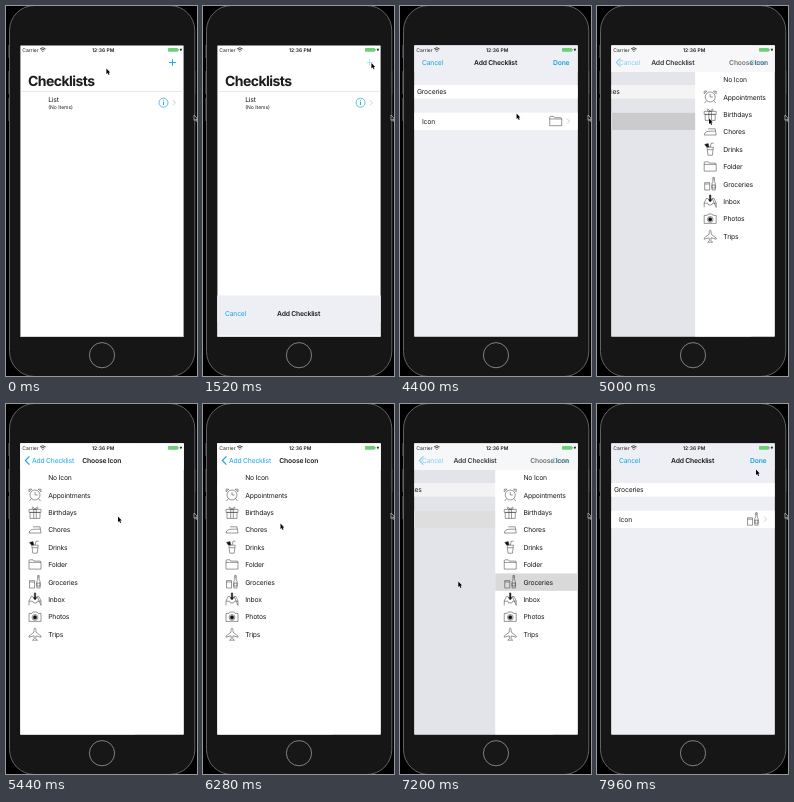
These frames come from a looping animation (191 px wide and 370 px high, 8000 ms). An HTML page:

```html
<!DOCTYPE html>
<html lang="en">
<head>
<meta charset="utf-8">
<title>Checklists</title>
<style>
  html, body { margin: 0; width: 100%; height: 100%; overflow: hidden; background: #000; }
  svg { display: block; width: 100vw; height: 100vh; }
  text { font: 6.8px Inter, Roboto, sans-serif; letter-spacing: -.03em; fill: #1c1c1c; white-space: pre; text-rendering: geometricPrecision; }
  .bold { font-weight: 600; }
  .large { font-size: 14px; font-weight: 700; letter-spacing: -.04em; }
  .small { font-size: 5px; letter-spacing: 0; }
  .tint { fill: #18a5e4; }
  .hint { fill: #c9c9cf; }
  .line { fill: none; stroke: #18a5e4; stroke-width: .9; }
  .chev { fill: none; stroke: #c4c4c9; stroke-width: .8; }
  .icon { fill: none; stroke: #333; stroke-width: .5; stroke-linejoin: round; }
  .icon .solid { fill: #111; }
</style>
</head>
<body>
<svg id="stage" viewBox="0 0 191 370"></svg>
<script>
const LOOP = 8000;
const stage = document.getElementById('stage');

const text = (x, y, str, cls = '', id = '') => `<text x="${x}" y="${y}" class="${cls}" id="${id}">${str}</text>`;
const rect = (x, y, w, h, fill, extra = '') => `<rect x="${x}" y="${y}" width="${w}" height="${h}" fill="${fill}" ${extra}/>`;
const page = (fill, extra) => rect(14, 39, 164, 292, fill, extra);
const path = (d, cls = '', extra = '') => `<path d="${d}" class="${cls}" ${extra}/>`;
const group = (id, body, extra = '') => `<g id="${id}" ${extra}>${body}</g>`;
const chevron = (x, y) => path(`M${x} ${y - 2.6}l2.4 2.6l-2.4 2.6`, 'chev');

// Line icons, each drawn around its own centre
const icons = {
  'No Icon': '',
  Appointments: '<circle r="5"/>' + path('M0-3V0H2.6M-3.6 3.6L-5.6 6M3.6 3.6L5.6 6M-6-3.2V-5.8H-3.2ZM6-3.2V-5.8H3.2Z'),
  Birthdays: path('M-6-3H6V0H-6ZM-5 0H5V6H-5ZM-1.3-3V6M1.3-3V6M0-3C-5-3-3-8 0-3C3-8 5-3 0-3'),
  Chores: path('M-6 3.2H6L5-3H-2M-6 3.2C-5.5 0-3-.6 0-.6H5.3'),
  Drinks: path('M-3.2-2H3.2L2.2 6H-2.2ZM-2.8 .5H2.8M0-2L1-6H3.5') + path('M-5.5-4.8L-2-5.6L-1.2-2.2H-3.6Z', 'solid'),
  Folder: path('M-6 4.5V-3.8Q-6-4.8-5-4.8H-2L-1-3.5H5Q6-3.5 6-2.5V4.5ZM-6-2.2H6'),
  Groceries: path('M-5.5 0H-.5V6H-5.5ZM-5.5-1.4H-.5V0M-5.5 0V-1.4M1.8 6V-.5L2.7-2.5V-6.5H4.2V-2.5L5.1-.5V6ZM1.8 1H5.1V4H1.8ZM2.7-5H4.2'),
  Inbox: path('M-6 6V1.5L-3.8-3H-2M2-3H3.8L6 1.5V6ZM-6 1.8H-2.5L-1.5 3.5H1.5L2.5 1.8H6') + path('M-.7-6.5H.7V-2H2L0 .6L-2-2H-.7Z', 'solid'),
  Photos: path('M-6-3.4H-3L-2-4.8H2L3-3.4H6V4.6H-6Z') + '<circle cy=".6" r="2.9"/><circle class="solid" cy=".6" r="1.8"/>',
  Trips: path('M0-6.3C1-6 1-4 1-2L6 1.8V3L1 1.6L.7 4.4L2.5 6H-2.5L-.7 4.4L-1 1.6L-6 3V1.8L-1-2C-1-4-1-6 0-6.3Z'),
};
const icon = (name, x, y, id = '') => group(id, icons[name], `class="icon" transform="translate(${x} ${y})"`);

const ROW = 17.4;
const iconRows = Object.keys(icons).map((name, i) => {
  const y = 73.6 + ROW * i;
  return icon(name, 29, y) + text(42.2, y + 2.5, name);
}).join('');

const arrow = 'M0 0V5.4L1.3 4.3L2.2 6.3L3.1 5.9L2.2 4H3.8Z';

const device =
  rect(2, 39, 2, 13, '#333') + rect(2, 65, 2, 23, '#333') + rect(2, 92, 2, 23, '#333') + rect(187.5, 65, 2, 23, '#333') +
  rect(3.5, -.5, 185.3, 371, '#161617', 'rx="25" stroke="#6c6c6f" stroke-width=".9"') +
  '<circle cx="96" cy="349.2" r="12.6" fill="#171718" stroke="#808083" stroke-width="1"/>';

const lists =
  page('#fff') +
  path('M163 56.5h7M166.5 53v7', 'line', 'id="plus"') +
  text(22, 79.5, 'Checklists', 'large') +
  rect(14, 85, 164, .6, '#dcdce0') +
  text(42.2, 95.5, 'List') + text(42.2, 102.8, '(No Items)', 'small') +
  '<circle class="line" cx="157.5" cy="96.7" r="4.5" style="stroke-width:.7"/>' +
  path('M157.5 95.7v3.4M157.5 93.7v.9', 'line') + chevron(167, 96.7);

const form = group('form',
  page('#eeeff4') +
  rect(14, 79, 164, 13.7, '#fff') + rect(14, 106.7, 164, 17.4, '#fff') +
  rect(14, 106.7, 164, 17.4, '#d4d4d6', 'id="pressed"') +
  text(17, 88.4, 'Name of the List', 'hint', 'hint') + text(17, 88.4, '', '', 'typed') +
  rect(0, 81.5, .9, 8.5, '#8fa3cc', 'id="caret"') +
  text(22, 117.7, 'Icon') + icon('Folder', 155.7, 115.2, 'folder') + icon('Groceries', 156, 115.2, 'bottle') +
  chevron(167, 115.2) + page('#000', 'id="dim"'));

const picker = group('picker',
  page('#fff') + rect(14, 65 + ROW * 6, 164, ROW, '#d9d9d9', 'id="chosen"') + iconRows);

const nav =
  rect(14, 39, 164, 27, '#eeeff4') + rect(14, 39, 164, 27, '#fff', 'id="light"') +
  text(22, 59, 'Cancel', 'tint', 'cancel') + text(153, 59, 'Done', 'tint bold', 'done') +
  text(0, 59, 'Add Checklist', 'bold', 'title') + text(0, 59, 'Add Checklist', 'tint', 'back') +
  text(0, 59, 'Choose Icon', 'bold', 'next') +
  path('M23.4 52.4l-4 4.1l4 4.1', 'line', 'id="chev" style="stroke-width:1.2"');

const status =
  text(16.3, 45.7, 'Carrier', 'small') + text(86, 45.7, '12:36 PM', 'small bold') +
  path('M34 42.9q2.8-2.4 5.6 0M35 44.1q1.8-1.5 3.6 0M36.2 45.3h1.2', '', 'fill="none" stroke="#222" stroke-width=".8"') +
  rect(162, 41.9, 10, 3.9, '#6bd075', 'rx=".8"') + rect(172.3, 43, .6, 1.7, '#888') +
  path('M173.6 42.8h2.6l-1.3 2.6z', '', 'fill="#222"');

stage.innerHTML =
  '<clipPath id="screen"><rect x="14.4" y="39.5" width="163.2" height="291"/></clipPath>' + device +
  group('view', lists + group('modal', form + picker + nav) + status, 'clip-path="url(#screen)"') +
  path(arrow, '', 'transform="translate(188 109)" fill="#111" stroke="#ccc" stroke-width=".7"') +
  path(arrow, '', 'id="pointer" fill="#000" stroke="#fff" stroke-width=".5" paint-order="stroke"');

const el = {};
stage.querySelectorAll('[id]').forEach(n => { if (n.id) el[n.id] = n; });
const move = (n, x, y = 0) => n.setAttribute('transform', `translate(${x} ${y})`);
const fade = (n, a) => n.setAttribute('opacity', Math.max(0, Math.min(1, a)));
const mix = (a, b, p) => a + (b - a) * p;

// Critically damped spring, 0 to 1
const spring = (ms, rate) => {
  if (ms <= 0) return 0;
  const k = ms * rate / 1000;
  const p = 1 - (1 + k) * Math.exp(-k);
  return p > .995 ? 1 : p;
};

const keys = [2720, 2880, 3080, 3160, 3280, 3360, 3560, 3760, 3840];

// Pointer way points: time, x, y
const route = [
  [80, 100.4, 62.6], [260, 128, 66.5], [480, 167.6, 57.5], [680, 167.6, 57.5], [760, 168.4, 57],
  [3840, 168.4, 57], [4400, 116.6, 107.6], [4520, 113, 110], [4680, 112, 112.6], [5440, 112, 112.6],
  [6240, 79, 115], [6800, 58.3, 177.6], [7240, 58.3, 177.6], [7760, 138, 87], [7960, 159, 65.6],
];
function pointerAt(t) {
  const i = route.findIndex(r => r[0] > t);
  if (i === 0) return route[0].slice(1);
  if (i < 0) return route.at(-1).slice(1);
  const [a, b] = [route[i - 1], route[i]];
  const p = (t - a[0]) / (b[0] - a[0]);
  return [mix(a[1], b[1], p), mix(a[2], b[2], p)];
}

function draw(t) {
  move(el.pointer, ...pointerAt(t));
  fade(el.plus, t < 1000 ? 1 : .3);
  move(el.modal, 0, 291 * (1 - spring(t - 1490, 21)));

  const count = keys.filter(k => k <= t).length;
  el.typed.textContent = 'Groceries'.slice(0, count);
  fade(el.hint, count ? 0 : 1);
  el.caret.setAttribute('x', 17 + (count ? el.typed.getComputedTextLength() : 0));
  fade(el.caret, (t >= 2120 && t < 4000) || (t >= 7600 && t < 7800) ? 1 : 0);

  const popping = t >= 7080;
  const p = popping ? 1 - spring(t - 7080, 13.75) : spring(t - 4882, 13.75);
  move(el.form, -49 * p);
  move(el.picker, 164 * (1 - p));
  fade(el.dim, .09 * p);
  fade(el.pressed, t < 4600 ? 0 : popping ? p : 1);
  fade(el.chosen, t >= 6960 ? 1 : 0);
  fade(el.folder, t < 6960 ? 1 : 0);
  fade(el.bottle, t < 6960 ? 0 : 1);

  fade(el.light, p);
  fade(el.cancel, 1 - p);
  fade(el.done, count ? 1 - p : 0);
  fade(el.title, 1.7 * (1 - p));
  fade(el.back, 2 * p - 1);
  fade(el.next, 1.2 * p);
  fade(el.chev, p);
  const x = mix(74, 26, p * (.7 + .3 * p));
  move(el.title, x);
  move(el.back, x);
  move(el.next, mix(185, 76.3, p));
}

const start = performance.now();
function tick() {
  draw((performance.now() - start) % LOOP);
  requestAnimationFrame(tick);
}
tick();
</script>
</body>
</html>
```
